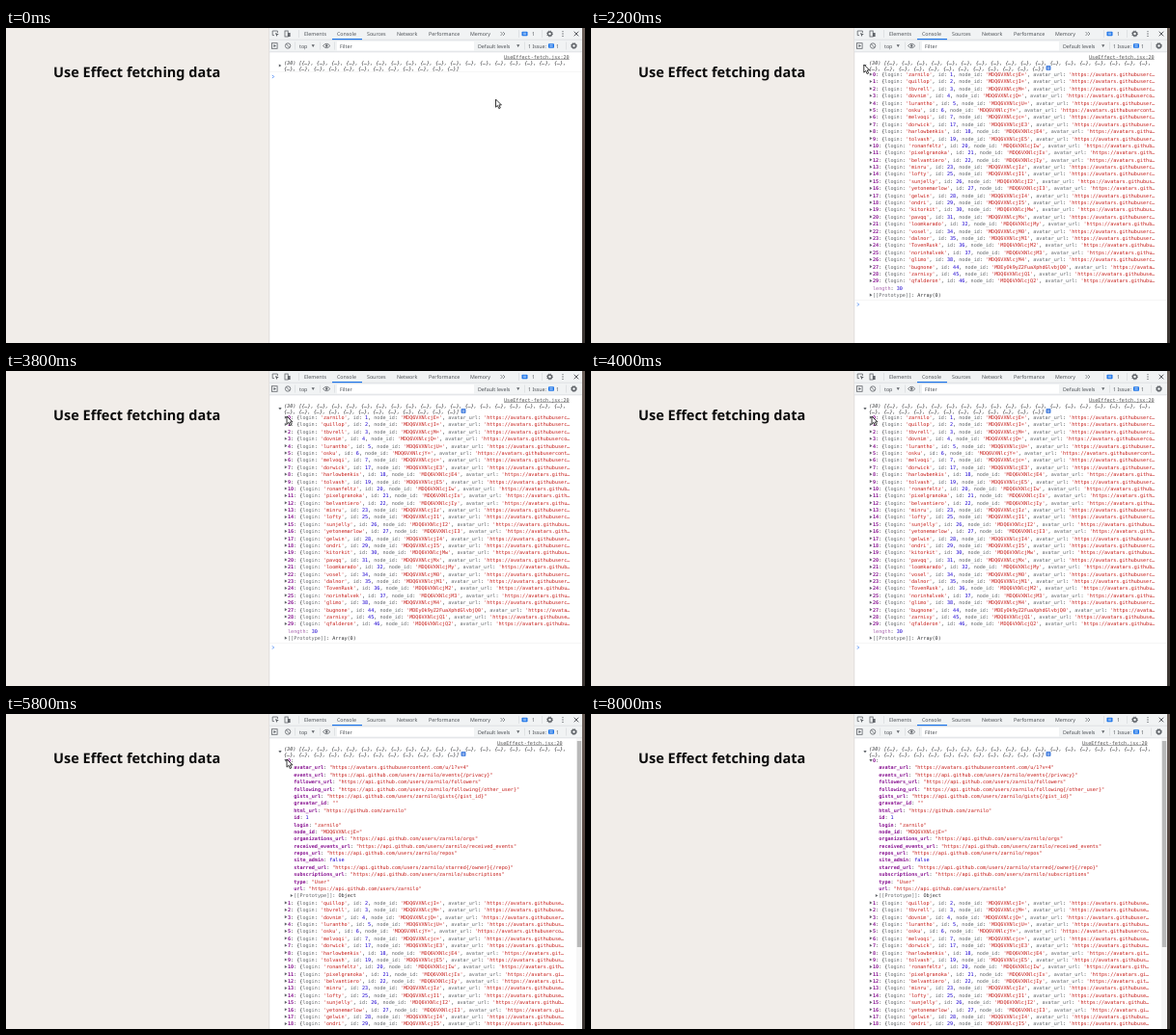
These frames come from a looping animation (600x327 px, 8200 ms). An HTML page:

```html
<!DOCTYPE html>
<html lang="en">
<head>
<meta charset="utf-8">
<title>Use Effect fetching data</title>
<style>
html, body { margin: 0; width: 100%; height: 100%; overflow: hidden; background: #f1ede9; }
svg { display: block; width: 100%; height: 100%; }
text { white-space: pre; text-rendering: geometricPrecision; }
.title { font: 700 14.5px "Noto Sans", "Open Sans", sans-serif; fill: #0c0c0c; }
.ui { font: 5.3px "Noto Sans", "Open Sans", sans-serif; fill: #4d5156; }
.mono { font: 5.12px "DejaVu Sans Mono", monospace; fill: #303134; }
.it { font-style: italic; }
.key { font-weight: 700; fill: #881391; }
.dim { fill: #a763ad; }
.name { fill: #626569; }
.str { fill: #c41a16; }
.num { fill: #1c00cf; }
.link { fill: #545454; text-decoration: underline; }
</style>
</head>
<body>
<svg id="stage" viewBox="0 0 600 327" xmlns="http://www.w3.org/2000/svg"></svg>
<script>
const LOOP = 8200, STEP = 200, LINE = 7.39, TOP = 50;
const OPEN_LIST = 1800, OPEN_ITEM = 4200, CURSOR_GONE = 6800;

const logins = `zarnilo quillop tbvrell dovnim lurantho osku melvoqi dorwick harlowbenkis tolvash
ronanfeltz pixelgranoka belvantiero minru lofty sunjelly yetonemarlow gelwin ondri kitorkit
pavqq loomkarado vosel dalnor TovenRusk norinhalvek glimo bugnone zarnixy qfalderon`.split(/\s+/);
const ids = [1, 2, 3, 4, 5, 6, 7, 17, 18, 19, 20, 21, 22, 23, 25, 26, 27, 28, 29, 30,
  31, 32, 34, 35, 36, 37, 38, 44, 45, 46];
const nodeId = id => btoa((id === 44 ? '012:Organization' : '04:User') + id);

const text = (cls, x, y, s) => `<text class="${cls}" x="${x}" y="${y}">${s}</text>`;
const spans = (x, y, tokens) => text('mono', x, y,
  tokens.map(([cls, s]) => `<tspan class="${cls}">${s}</tspan>`).join(''));
const rect = (x, y, w, h, fill, extra = '') =>
  `<rect x="${x}" y="${y}" width="${w}" height="${h}" fill="${fill}" ${extra}/>`;
const path = (d, stroke = '#5f6368', fill = 'none', w = 0.8) =>
  `<path d="${d}" stroke="${stroke}" fill="${fill}" stroke-width="${w}"/>`;
const arrow = (x, y, open) => path(
  open ? `M${x - 0.4} ${y - 1}h3.2l-1.6 2.6z` : `M${x} ${y - 1.6}l2.6 1.6l-2.6 1.6z`,
  'none', '#5f6368');
const dot = (x, y, r) => `<circle cx="${x}" cy="${y}" r="${r}" fill="#5f6368"/>`;

function gear(x, y) {
  return `<circle cx="${x}" cy="${y}" r="2" fill="none" stroke="#5f6368" stroke-width="1.3"/>
    <circle cx="${x}" cy="${y}" r="2.9" fill="none" stroke="#5f6368" stroke-width="1"
      stroke-dasharray="1.14 1.14"/>`;
}

function badge(x, y) {
  return rect(x, y - 2.5, 6, 4.6, '#1a73e8', 'rx="0.8"') +
    path(`M${x + 1.3} ${y - 1}h3.4M${x + 1.3} ${y + 0.5}h3.4`, '#fff', 'none', 0.6);
}

function toolbar() {
  const tabs = [[309, 'Elements'], [343, 'Console'], [374, 'Sources'], [405, 'Network'],
    [438, 'Performance'], [481, 'Memory']];
  const bars = [[303.5, 2], [531, 2], [555, 2], [299.5, 14.5], [325, 14.5], [340, 14.5],
    [537, 14.5], [580, 14.5]];
  return rect(273, 0, 324, 25, '#f1f3f4') +
    rect(273, 11.8, 324, 0.6, '#cfd2d6') + rect(273, 24.6, 324, 0.6, '#cfd2d6') +
    tabs.map(([x, s]) => text('ui', x, 8, s)).join('') +
    rect(338, 11, 31, 1.2, '#1a73e8') +
    bars.map(([x, y]) => rect(x, y, 0.5, 8, '#cdd0d4')).join('') +
    path('M278 7.6h-1.8v-4.6h5.2v2') + path('M279 5l3.8 1.6l-1.6 .6l-.7 1.7z', 'none', '#5f6368') +
    rect(289, 3, 3.2, 6, 'none', 'stroke="#5f6368" stroke-width=".8"') +
    rect(292, 5, 2.6, 4, '#5f6368') +
    path('M512.5 4l2 2l-2 2M515 4l2 2l-2 2', '#5f6368', 'none', 0.7) +
    badge(534.5, 6.2) + text('ui', 545, 8, '1') + gear(563.5, 6) +
    dot(577, 3.6, 0.65) + dot(577, 6, 0.65) + dot(577, 8.4, 0.65) +
    path('M588.7 3.7l4.6 4.6m0 -4.6l-4.6 4.6', '#4d5156', 'none', 0.9) +
    rect(275.5, 15.7, 5.6, 5.6, 'none', 'stroke="#5f6368" stroke-width=".8"') +
    path('M277.4 16.9l2.6 1.6l-2.6 1.6z', 'none', '#5f6368') +
    path('M289.4 18.5a2.7 2.7 0 1 0 5.4 0a2.7 2.7 0 1 0 -5.4 0M290.2 16.6l3.8 3.8') +
    text('ui', 304, 20.5, 'top') + arrow(317, 18.3, true) +
    path('M328.5 18.5q3.7 -4.4 7.4 0q-3.7 4.4 -7.4 0z') + dot(332.2, 18.5, 1.2) +
    rect(343, 14, 142, 9.3, '#fff') + text('ui', 346, 20.5, 'Filter') +
    text('ui', 489, 20.5, 'Default levels') + arrow(529.5, 18.3, true) +
    text('ui', 541, 20.5, '1 Issue:') + badge(562, 18.7) + text('ui', 570, 20.5, '1') +
    gear(588.5, 18.5);
}

function summary(open, linkX) {
  const cells = n => Array(n).fill('{…}').join(', ');
  return text('mono link', linkX, 31.5, 'UseEffect-fetch.jsx:20') +
    text('mono it', 288, 37.5, `(30) [${cells(18)},`) +
    text('mono it', 288, 43.6, cells(12) + ']') +
    arrow(282.8, 39, open) +
    (open ? rect(471.5, 39, 5, 5, '#4c84e0', 'rx="1"') +
      path('M474 40v.7M474 41.3v1.9', '#fff', 'none', 0.8) : '');
}

// One collapsed user, clipped to a number of characters
function userRow(i, y, room) {
  const tokens = [['key', String(i)], ['', ': {'], ['name', 'login'], ['', ': '],
    ['str', `'${logins[i]}'`], ['', ', '], ['name', 'id'], ['', ': '], ['num', String(ids[i])],
    ['', ', '], ['name', 'node_id'], ['', ': '], ['str', `'${nodeId(ids[i])}'`], ['', ', '],
    ['name', 'avatar_url'], ['', ': '], ['str', `'https://avatars.githubusercontent.com/u/`]];
  let left = room - 1;
  const shown = tokens.map(([cls, s]) => {
    const part = s.slice(0, Math.max(left, 0));
    left -= s.length;
    return [cls, part];
  });
  return arrow(288.8, y - 1.9, false) + spans(292, y, [...shown, ['str', '…']]);
}

function prompt(y) {
  return rect(273, y - 5, 324, 0.5, '#ececec') +
    path(`M276 ${y - 1.6}l1.6 1.6l-1.6 1.6`, '#367cf1', 'none', 0.8);
}

function listView() {
  const end = TOP + 30 * LINE;
  return summary(true, 516) +
    logins.map((_, i) => userRow(i, TOP + i * LINE, 95)).join('') +
    spans(292, end, [['dim', 'length'], ['', ': '], ['num', '30']]) +
    arrow(288.8, end + LINE - 1.9, false) +
    spans(292, end + LINE, [['name', '[[Prototype]]'], ['', ': Array(0)']]) +
    prompt(287);
}

function itemView() {
  const api = 'https://api.github.com/users/' + logins[0];
  const q = s => `"${s}"`;
  const props = {
    avatar_url: q('https://avatars.githubusercontent.com/u/1?v=4'),
    events_url: q(api + '/events{/privacy}'),
    followers_url: q(api + '/followers'),
    following_url: q(api + '/following{/other_user}'),
    gists_url: q(api + '/gists{/gist_id}'),
    gravatar_id: q(''),
    html_url: q('https://github.com/' + logins[0]),
    id: 1,
    login: q(logins[0]),
    node_id: q(nodeId(1)),
    organizations_url: q(api + '/orgs'),
    received_events_url: q(api + '/received_events'),
    repos_url: q(api + '/repos'),
    site_admin: false,
    starred_url: q(api + '/starred{/owner}{/repo}'),
    subscriptions_url: q(api + '/subscriptions'),
    type: q('User'),
    url: q(api)
  };
  const proto = TOP + 19 * LINE;
  const rows = Object.entries(props).map(([k, v], i) => spans(298.3, TOP + (i + 1) * LINE,
    [['key', k], ['', ': '], [typeof v === 'string' ? 'str' : 'num', v]]));
  const rest = logins.slice(1, 19).map((_, i) => userRow(i + 1, proto + (i + 1) * LINE, 93));
  return summary(true, 509) + arrow(288.8, TOP - 1.9, true) +
    spans(292, TOP, [['key', '0'], ['', ':']]) + rows.join('') +
    arrow(294.8, proto - 1.9, false) +
    spans(298.3, proto, [['name', '[[Prototype]]'], ['', ': Object']]) + rest.join('') +
    rect(591, 25.2, 6, 302, '#f6f6f6') + rect(591.8, 28, 4.4, 214, '#b9b9b9');
}

const stage = document.getElementById('stage');
stage.innerHTML = `
  <defs><linearGradient id="edge" x2="0" y2="1">
    <stop stop-color="#6a5f59"/><stop offset=".5" stop-color="#51403b"/>
    <stop offset="1" stop-color="#3b3633"/>
  </linearGradient></defs>` +
  rect(0, 0, 600, 327, '#f1ede9') +
  text('title', 49, 50.5, 'Use Effect fetching data') +
  rect(273, 0, 324, 327, '#fff') + rect(272.6, 0, 0.6, 327, '#d5d3d1') +
  `<g class="view">${summary(false, 516) + prompt(50.5)}</g>
   <g class="view">${listView()}</g>
   <g class="view">${itemView()}</g>` +
  toolbar() + rect(597, 0, 3, 327, 'url(#edge)') +
  `<g id="cursor">${path('M0 0v8.2l1.9-1.8l1.4 3.2l1.5-.7l-1.4-3h2.5z', '#222', '#fff', 0.9)}</g>`;

const views = [...stage.querySelectorAll('.view')];
const cursor = document.getElementById('cursor');

// time, x, y of the pointer tip
const route = [[200, 507.5, 74], [1200, 282.8, 38], [2800, 282.8, 38], [3600, 291, 47], [LOOP, 291, 47]];

function pointer(t) {
  if (t <= route[0][0]) return route[0].slice(1);
  const i = route.findIndex(p => p[0] >= t);
  const [t0, x0, y0] = route[i - 1], [t1, x1, y1] = route[i];
  const u = (t - t0) / (t1 - t0), e = u * u * (3 - 2 * u);
  return [x0 + (x1 - x0) * e, y0 + (y1 - y0) * e];
}

function draw(time) {
  const t = Math.floor(time % LOOP / STEP) * STEP;
  const current = t < OPEN_LIST ? 0 : t < OPEN_ITEM ? 1 : 2;
  views.forEach((v, i) => v.setAttribute('display', i === current ? 'inline' : 'none'));
  cursor.setAttribute('transform', `translate(${pointer(t)})`);
  cursor.setAttribute('display', t < CURSOR_GONE ? 'inline' : 'none');
}

const start = performance.now();
function tick() {
  draw(performance.now() - start);
  requestAnimationFrame(tick);
}
tick();
</script>
</body>
</html>
```
